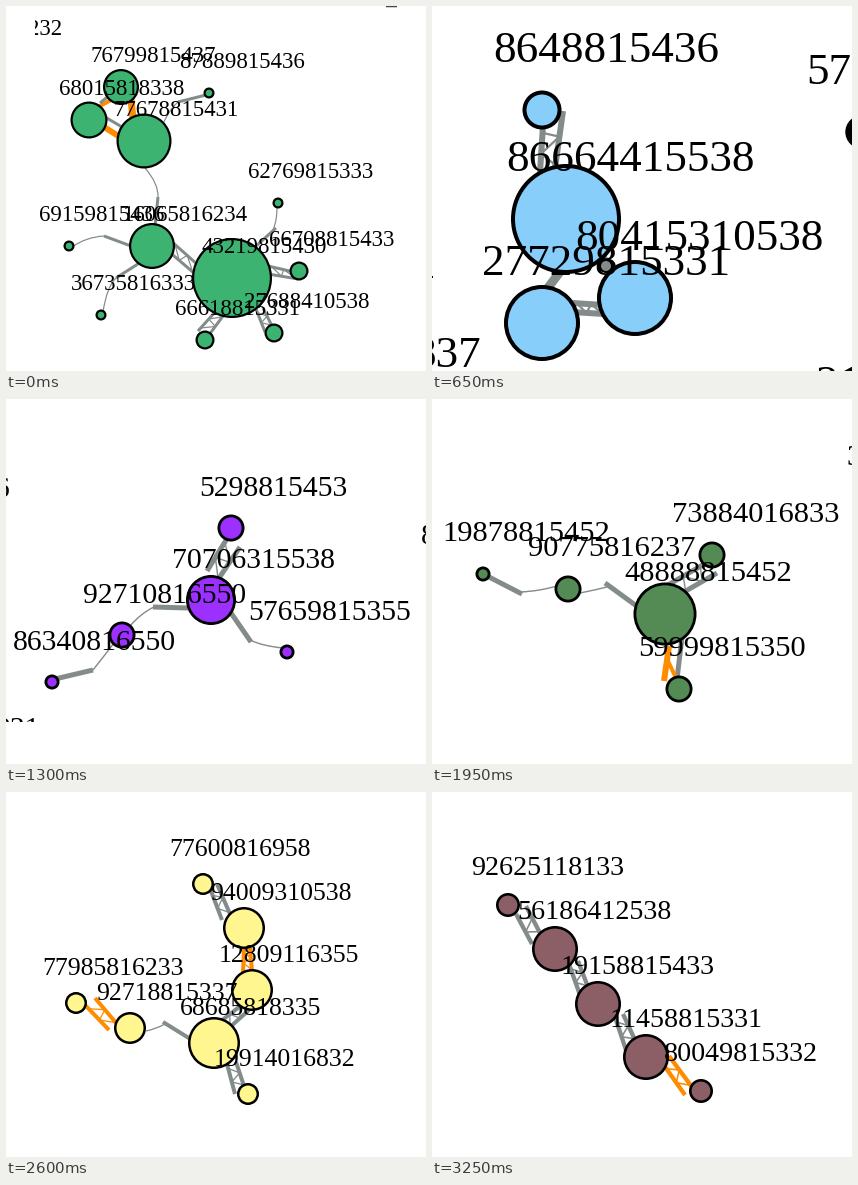
These frames come from a looping animation (420 by 365 pixels, 3900 ms). A matplotlib script:

```python
import matplotlib.pyplot as plt
from matplotlib.animation import FuncAnimation
from matplotlib.patches import Circle, PathPatch, Rectangle
from matplotlib.path import Path

W, H, DPI = 420, 365, 100
PT = 72 / DPI  # points per pixel
GRAY, ORANGE = "#838b8b", "#ff8c00"

fig = plt.figure(figsize=(W / DPI, H / DPI), dpi=DPI, facecolor="white")
ax = fig.add_axes([0, 0, 1, 1])


class Graph:
    """One network cluster at a given zoom (em = label size in pixels)."""

    def __init__(self, em, fill, outline, bar, thin):
        self.em, self.fill, self.outline = em, fill, outline
        self.bar_width, self.thin = bar, thin

    def text(self, x, y, label, ha="center"):
        ax.text(x, y + 0.33 * self.em, label, ha=ha, va="baseline",
                family="Liberation Serif", size=self.em * PT, color="black",
                zorder=5, clip_on=True)

    def node(self, x, y, r, label):
        ax.add_patch(Circle((x, y), r - self.outline / 2, facecolor=self.fill,
                            edgecolor="black", linewidth=self.outline * PT,
                            zorder=3))
        self.text(x + 1.42 * self.em, y - 1.4 * self.em, label)

    def bar(self, x0, y0, x1, y1, color=GRAY, width=None):
        ax.plot([x0, x1], [y0, y1], color=color, zorder=2,
                lw=(width or self.bar_width) * PT, solid_capstyle="butt")

    def curve(self, start, bend, end):
        path = Path([start, bend, end], [Path.MOVETO, Path.CURVE3, Path.CURVE3])
        ax.add_patch(PathPatch(path, facecolor="none", edgecolor=GRAY,
                               linewidth=self.thin * PT, zorder=1))

    def rails(self, a, b, color=GRAY):
        """Two parallel bars joined by slanted thin rungs."""
        self.bar(*a, color)
        self.bar(*b, color)

        def at(s, t):
            return s[0] + (s[2] - s[0]) * t, s[1] + (s[3] - s[1]) * t

        zigzag = [at(a, 0.15), at(b, 0.45), at(a, 0.6), at(b, 0.95)]
        ax.plot(*zip(*zigzag), color=color, lw=self.thin * PT, zorder=1)


def mask(x, y, w, h):
    ax.add_patch(Rectangle((x, y), w, h, facecolor="white", zorder=9))


def sea_green():
    g = Graph(22.9, "#3cb371", 2.2, 3, 1.2)
    g.bar(92, 101, 105, 94, ORANGE, 4)
    g.bar(125, 93, 127, 113, ORANGE, 7)
    g.bar(98, 121, 114, 131, ORANGE, 6)
    g.bar(99, 111, 116, 121)
    g.bar(94, 97, 104, 89)
    g.bar(200, 89, 172, 96)
    g.curve((172, 96), (163, 104), (158, 116))
    g.curve((139, 162), (153, 178), (152, 192))
    g.bar(152, 191, 149, 220)
    g.curve((66, 241), (80, 231), (98, 230))
    g.bar(98, 230, 125, 240)
    g.curve((97, 306), (101, 280), (110, 272))
    g.bar(110, 272, 135, 256)
    g.rails((165, 235, 192, 259), (161, 244, 188, 267))
    g.curve((271, 201), (271, 215), (267, 224))
    g.bar(270, 222, 249, 241)
    g.rails((262, 260, 288, 266), (262, 268, 292, 273))
    g.rails((250, 303, 259, 326), (257, 302, 266, 320))
    g.rails((192, 325, 210, 305), (203, 329, 217, 310))
    g.node(115, 81, 18, "76799815437")
    g.node(83, 114, 18.5, "68015818338")
    g.node(203, 87, 5.5, "87889815436")
    g.node(138, 135, 27.5, "77678815431")
    g.node(272, 197, 5.5, "62769815333")
    g.node(63, 240, 5.5, "69159815436")
    g.node(146, 240, 23, "16065816234")
    g.node(226, 272, 40, "43219815430")
    g.node(293, 265, 9.5, "66708815433")
    g.node(95, 309, 5.5, "36735816333")
    g.node(199, 334, 9.5, "66618815331")
    g.node(268, 327, 9.5, "27688410538")
    g.text(56, 21, "232", "right")
    mask(0, 0, 29, 40)
    g.bar(380, 0, 391, 0, "#444444", 2.5)


def sky_blue():
    g = Graph(45.2, "#87cefa", 4, 6, 2.2)
    g.rails((111, 120, 108, 166), (131, 105, 123, 162))
    g.bar(134, 258, 115, 283, width=9)
    g.bar(166, 247, 185, 270, width=9)
    g.rails((140, 297, 172, 299), (140, 306, 172, 308))
    ax.add_patch(Circle((174, 260), 6, facecolor=GRAY, edgecolor="black",
                        linewidth=2 * PT, zorder=2.5))
    g.node(110, 104, 19.5, "8648815436")
    g.node(134, 213, 55, "86664415538")
    g.node(203, 292, 38, "80415310538")
    g.node(110, 317, 38, "27729815331")
    ax.add_patch(Circle((430, 126), 16, color="black"))
    g.text(374, 63, "570", "left")
    g.text(49, 346, "837", "right")
    g.text(384, 375, "210", "left")
    g.bar(0, 271, 1, 271, "black", 2)


def purple():
    g = Graph(29.8, "#9b30ff", 2.8, 5, 1.4)
    g.rails((222, 138, 201, 172), (234, 148, 211, 182))
    g.bar(182, 209, 147, 208)
    g.curve((148, 208), (135, 214), (123, 228))
    g.bar(49, 280, 87, 271)
    g.curve((87, 271), (95, 261), (108, 244))
    g.bar(225, 214, 245, 243)
    g.curve((244, 241), (256, 247), (277, 249))
    g.node(225, 129, 13.5, "5298815453")
    g.node(205, 201, 25, "70706315538")
    g.node(116, 236, 13.5, "92710816550")
    g.node(46, 283, 7.5, "86340816550")
    g.node(281, 253, 7.5, "57659815355")
    g.text(3, 88, "6", "right")
    g.text(415, 135, "8", "left")
    g.text(34, 328, "031", "right")
    mask(0, 323, W, 42)


def leaf_green():
    g = Graph(30.5, "#548b54", 2.8, 5, 1.4)
    g.bar(57, 178, 90, 195)
    g.curve((89, 193), (108, 192), (125, 187))
    g.curve((148, 194), (163, 191), (175, 188))
    g.bar(173, 184, 206, 208)
    g.rails((274, 164, 236, 186), (285, 174, 252, 193))
    g.bar(250, 238, 245, 280)
    g.bar(237, 247, 232, 282, ORANGE, 6)
    g.bar(236, 262, 244, 279, ORANGE, 4)
    g.node(280, 156, 13.5, "73884016833")
    g.node(51, 175, 7.5, "19878815452")
    g.node(136, 190, 13.5, "90775816237")
    g.node(233, 215, 31.5, "48888815452")
    g.node(247, 290, 13.5, "59999815350")
    g.text(415, 56, "3", "left")


def pale_yellow():
    g = Graph(25.8, "#fff68f", 2.5, 4, 1.3)
    g.rails((205, 99, 216, 128), (211, 92, 224, 122))
    g.rails((238, 156, 237, 181), (244, 156, 246, 179), ORANGE)
    g.rails((79, 213, 103, 238), (89, 206, 111, 232), ORANGE)
    g.curve((140, 239), (150, 237), (159, 232))
    g.bar(157, 230, 186, 248)
    g.rails((237, 212, 215, 229), (243, 218, 223, 236))
    g.rails((221, 272, 229, 302), (230, 270, 238, 294))
    g.node(197, 92, 11, "77600816958")
    g.node(238, 136, 21, "94009310538")
    g.node(246, 198, 21, "12809116355")
    g.node(70, 211, 11, "77985816233")
    g.node(124, 236, 16, "92718815337")
    g.node(208, 251, 26, "68685818335")
    g.node(242, 302, 11, "19914016832")


def dusty_rose():
    g = Graph(28, "#8b5f65", 2.6, 4.3, 1.6)
    g.rails((84, 122, 100, 152), (94, 114, 108, 141))
    g.rails((137, 172, 148, 203), (146, 169, 156, 195))
    g.rails((183, 225, 194, 258), (191, 222, 203, 248))
    g.rails((231, 272, 253, 303), (237, 264, 260, 295), ORANGE)
    g.node(76, 113, 12, "92625118133")
    g.node(123, 157, 23, "56186412538")
    g.node(166, 212, 23, "19158815433")
    g.node(214, 265, 23, "11458815331")
    g.node(269, 299, 12, "80049815332")


SCENES = [sea_green, sky_blue, purple, leaf_green, pale_yellow, dusty_rose]


def draw(i):
    ax.cla()
    ax.set_xlim(0, W)
    ax.set_ylim(H, 0)
    ax.set_autoscale_on(False)
    ax.axis("off")
    SCENES[i]()
    return []


anim = FuncAnimation(fig, draw, frames=len(SCENES), interval=650,
                     init_func=lambda: [], repeat=True, repeat_delay=0)
plt.show()
```
